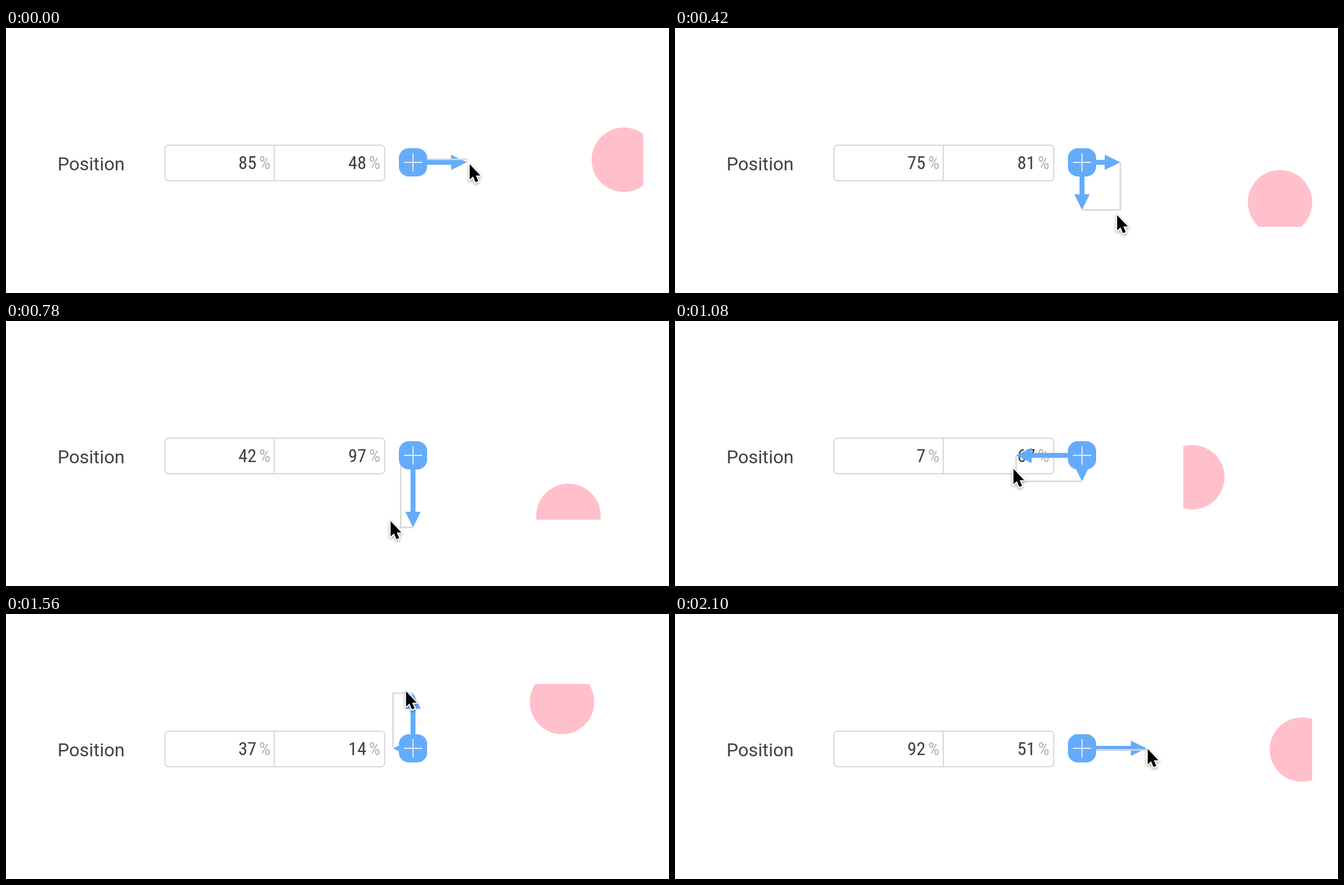
An HTML page for the animation above (2160 ms loop, 1080 by 432 pixels).

```html
<!DOCTYPE html>
<html lang="en">
<head>
<meta charset="utf-8">
<title>Position control</title>
<style>
  html, body { margin: 0; width: 100%; height: 100%; overflow: hidden; background: #fff; }
  svg { display: block; width: 1080px; height: 432px; }
  text { font: 30px Roboto, sans-serif; fill: #404040; }
  .num, .unit { font-family: "Roboto Condensed", Roboto, sans-serif; font-stretch: 75%; }
  .num { text-anchor: end; }
  .unit { fill: #b3b3b3; }
  .rule { fill: none; stroke: #d9d9d9; stroke-width: 2; }
  .blue { fill: #64acfb; }
  #pointer { stroke: #fff; stroke-width: 4; stroke-linejoin: round; paint-order: stroke;
    filter: drop-shadow(0 2px 2px rgba(0, 0, 0, .35)); }
</style>
</head>
<body>
<svg viewBox="0 0 1080 432">
  <clipPath id="area"><rect x="828" y="114" width="210" height="210"/></clipPath>
  <g clip-path="url(#area)"><circle id="ball" r="52.5" fill="#ffc0cb"/></g>

  <text x="84" y="232">Position</text>
  <rect class="rule" x="259" y="191" width="358" height="58" rx="6"/>
  <path class="rule" d="M437 191V249"/>
  <text class="num" id="numX" x="408" y="230"/>
  <text class="unit" x="412" y="230">%</text>
  <text class="num" id="numY" x="587" y="230"/>
  <text class="unit" x="591" y="230">%</text>

  <g transform="translate(663 219)">
    <path class="blue" id="arrowX"/>
    <path class="blue" id="arrowY" transform="rotate(90)"/>
    <path class="rule" id="guide" style="stroke-width:2.5"/>
    <rect class="blue" x="-23" y="-23" width="46" height="46" rx="16"/>
    <path d="M-15 0H15M0 -15V15" stroke="#e3e6ea" stroke-width="2"/>
  </g>
  <path id="pointer" d="M1 1V26L6.5 21L10.5 30.5L15 28.5L11 19.5H18.5Z"/>
</svg>
<script>
  const LOOP = 2160, STEP = 60, SCALE = 2.5;
  // Turning points of one clockwise drag
  const path = [
    { s: 0, x: 85, y: 48 }, { s: 3, x: 87, y: 60 }, { s: 7, x: 75, y: 81 },
    { s: 9, x: 68, y: 88 }, { s: 13, x: 42, y: 97 }, { s: 18, x: 7, y: 67 },
    { s: 22, x: 9, y: 35 }, { s: 26, x: 37, y: 14 }, { s: 31, x: 75, y: 23 },
    { s: 35, x: 92, y: 51 }, { s: 36, x: 92, y: 51 }
  ];
  const $ = id => document.getElementById(id);

  function slope(i, axis) {
    const a = path[Math.max(i - 1, 0)], b = path[Math.min(i + 1, path.length - 1)];
    return (b[axis] - a[axis]) / (b.s - a.s);
  }

  // Smooth curve through the turning points
  function at(step, axis) {
    const i = Math.max(1, path.findIndex(p => p.s >= step)) - 1;
    const a = path[i], b = path[i + 1], span = b.s - a.s;
    const u = (step - a.s) / span, v = 1 - u;
    return v * v * (1 + 2 * u) * a[axis] + u * u * (1 + 2 * v) * b[axis]
      + span * u * v * (v * slope(i, axis) - u * slope(i + 1, axis));
  }

  const offset = percent => (percent - 50) * SCALE;

  function arrow(tip) {
    const base = tip - (tip < 0 ? -25.5 : 25.5);
    return `M0 -4H${base}V-12.5L${tip} 0L${base} 12.5V4H0Z`;
  }

  function draw(now) {
    const step = Math.floor(now % LOOP / STEP);
    const x = Math.round(at(step, 'x')), y = Math.round(at(step, 'y'));
    const dx = offset(x), dy = offset(y);

    $('numX').textContent = x;
    $('numY').textContent = y;
    $('ball').setAttribute('cx', 828 + x * 2.1);
    $('ball').setAttribute('cy', 114 + y * 2.1);
    $('arrowX').setAttribute('d', arrow(dx));
    $('arrowY').setAttribute('d', arrow(dy));
    $('guide').setAttribute('d', `M0 ${dy}H${dx}V0`);

    // The pointer runs one step ahead of the value
    const px = 664 + offset(at(step + 1, 'x'));
    const py = 216.5 + offset(at(step + 1, 'y'));
    $('pointer').setAttribute('transform', `translate(${px} ${py})`);
    requestAnimationFrame(draw);
  }
  draw(performance.now());
</script>
</body>
</html>
```
